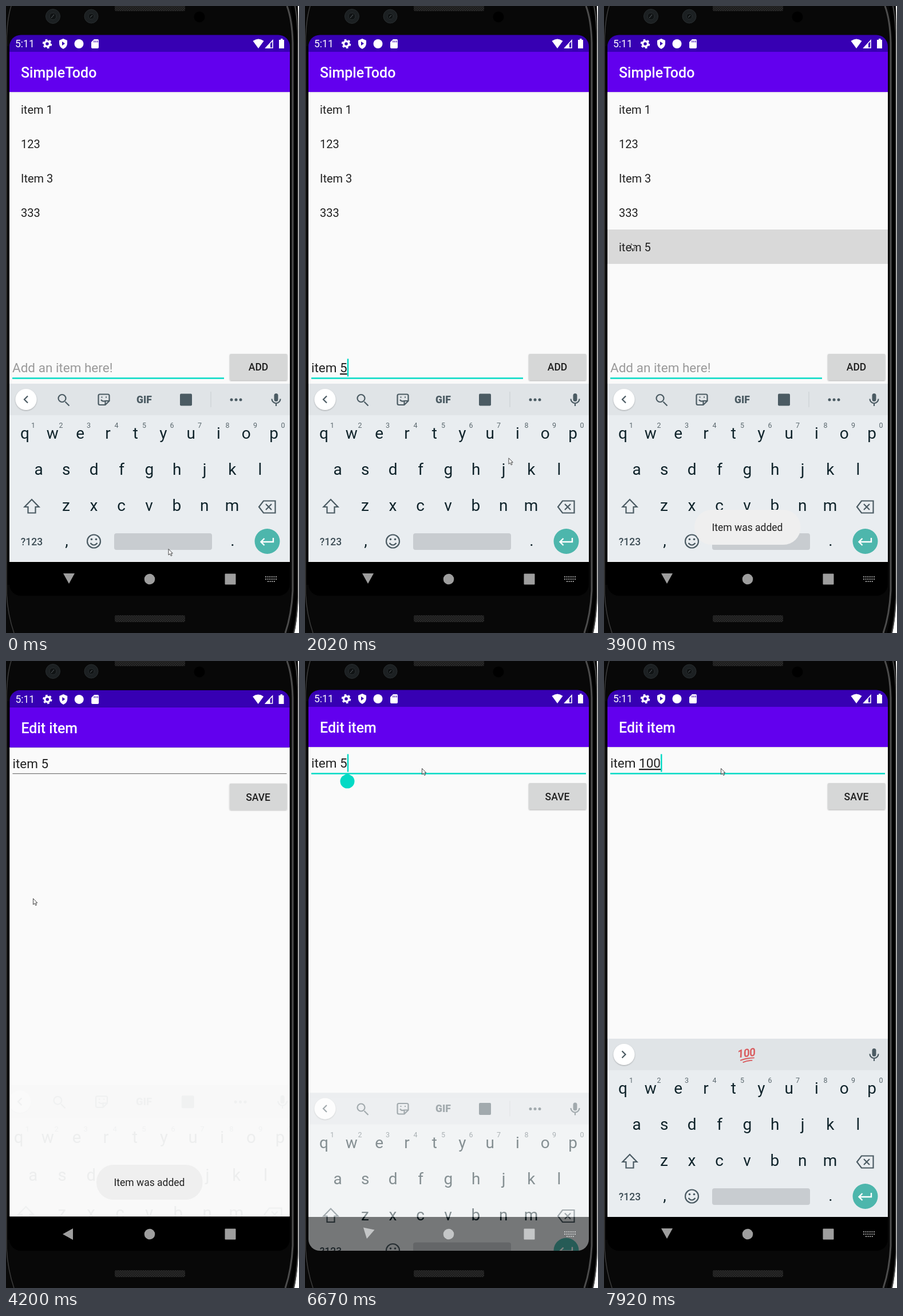
An HTML page for the animation above (8 s loop, 512x1094 px).

```html
<!DOCTYPE html>
<html lang="en">
<head>
<meta charset="utf-8">
<title>Todo list demo</title>
<style>
  html, body { margin: 0; height: 100%; overflow: hidden; background: #fff; }
  svg { display: block; width: 100vw; height: 100vh; font-family: Roboto, sans-serif; }
  text { white-space: pre; }
  .mid { text-anchor: middle; }
  .title { font-size: 25px; font-weight: 500; fill: #fff; }
  .item { font-size: 20px; fill: #212121; }
  .field { font-size: 22.5px; fill: #212121; }
  .label { font-size: 17.5px; font-weight: 500; fill: #1f1f1f; text-anchor: middle; }
  .key { font-size: 28px; fill: #10242b; text-anchor: middle; }
  .hint { font-size: 12.5px; fill: #5b686e; text-anchor: middle; }
  .word { font-size: 22.5px; fill: #6d787e; text-anchor: middle; }
  .line { fill: none; stroke: #4b5b63; stroke-width: 2.2; }
  .typed { text-decoration: underline; }
</style>
</head>
<body>
<svg viewBox="0 0 512 1094" preserveAspectRatio="none">
  <defs>
    <clipPath id="screen"><rect x="6" y="50.5" width="490" height="978.5" rx="20"/></clipPath>
    <clipPath id="aboveNav"><rect x="6" y="50" width="490" height="919"/></clipPath>
    <pattern id="mesh" width="4" height="4" patternUnits="userSpaceOnUse">
      <rect width="4" height="4" fill="#1a1a1a"/><path d="M0 0l4 4M4 0L0 4" stroke="#303030" stroke-width=".7"/>
    </pattern>
    <filter id="shadow" x="-20%" y="-20%" width="140%" height="150%">
      <feDropShadow dx="0" dy="1" stdDeviation="1.2" flood-opacity=".3"/>
    </filter>
  </defs>

  <!-- phone body -->
  <path d="M0 0H510Q511 30 511 64V1030Q510 1066 504 1094H0z" fill="#080808"/>
  <g fill="none">
    <path d="M9 0Q2 22 1 60V1025Q3 1062 14 1094" stroke="#3c3c3c" stroke-width="1.5"/>
    <path d="M4 70V1010" stroke="#000" stroke-width="4"/>
    <path d="M491 0Q500 24 501 64V1020Q499 1062 488 1094" stroke="#4c4c4c" stroke-width="3"/>
    <path d="M500 0Q506 30 506 64V1030Q504 1066 497 1094" stroke="#000" stroke-width="5"/>
    <path d="M505 0Q510 24 510 64V1030Q509 1066 503 1094" stroke="#555" stroke-width="1.5"/>
  </g>
  <g fill="#1c2022" stroke="#292e30">
    <circle cx="82" cy="18" r="12.5"/><circle cx="149" cy="18" r="12"/>
    <circle cx="82" cy="18" r="6" fill="#101314"/><circle cx="149" cy="18" r="5" fill="#101314"/>
  </g>
  <path d="M79 21l5-6M147 20l4-4" stroke="#596064"/>
  <circle cx="338" cy="19" r="9.5"/>
  <rect x="190" y="-4" width="123" height="13" rx="3" fill="url(#mesh)"/>
  <rect x="190" y="1063" width="123" height="12" rx="3" fill="url(#mesh)"/>

  <g clip-path="url(#screen)">
    <rect x="6" y="50" width="490" height="979"/>
    <g id="app">
      <rect x="6" y="150" width="490" height="820" fill="#fafafa"/>
      <g id="listPage">
        <rect id="pressedRow" x="6" y="390" width="490" height="60" fill="#d9d9d9"/>
        <g id="items"></g>
        <text id="placeholder" class="field" x="11" y="639" style="fill:#999">Add an item here!</text>
        <text id="newText" class="field" x="11" y="639"></text>
        <path d="M11 649.5H381" stroke="#03dac5" stroke-width="2.5"/>
        <rect id="addButton" x="391" y="607" width="100.5" height="46" rx="2" filter="url(#shadow)"/>
        <text class="label" x="441" y="636">ADD</text>
      </g>
      <g id="editPage">
        <rect x="6" y="150" width="490" height="820" fill="#fafafa"/>
        <text id="editText" class="field" x="11" y="186"></text>
        <rect id="editLine" x="11" y="195.2" width="480"/>
        <rect x="391" y="213" width="100.5" height="46" rx="2" fill="#d6d7d7" filter="url(#shadow)"/>
        <text class="label" x="441" y="243">SAVE</text>
      </g>
      <path id="handle" d="M74 196L83 201.2A12.5 12.5 0 1 1 65 201.2Z" fill="#03dac5"/>
      <rect id="caret" width="2.5" height="31" fill="#03dac5"/>
      <rect x="6" y="150" width="490" height="1.5" fill="#e3dfeb"/>
      <rect x="6" y="80" width="490" height="70" fill="#6200ee"/>
      <rect x="6" y="50" width="490" height="30" fill="#3700b3"/>
      <text id="title" class="title" x="26" y="125"></text>
      <g fill="#fff">
        <text x="16" y="72" font-size="17.5">5:11</text>
        <circle cx="72" cy="66" r="4.5" fill="none" stroke="#fff" stroke-width="3.5"/>
        <circle cx="72" cy="66" r="7" fill="none" stroke="#fff" stroke-width="2.5" stroke-dasharray="3.67 3.66"/>
        <path d="M100 57l7 3v5q0 7-7 10q-7-3-7-10v-5z"/>
        <path d="M98 62l5 3.5l-5 3.5z" fill="#3700b3"/>
        <circle cx="127.5" cy="66" r="8"/>
        <path d="M154 58h6q2 0 2 2v12q0 2-2 2h-9q-2 0-2-2v-9z"/>
        <path d="M154 60.5v3M157 60.5v3M160 60.5v3" stroke="#3700b3" stroke-width="1.3"/>
        <path d="M431.5 61Q441 54 450.5 61L441 74z"/>
        <path d="M454 73L466 60V73z" fill="none" stroke="#fff" stroke-width="1.6"/><path d="M453 74l9-9v9z"/>
        <path d="M480 57h3.5v2h2.5v15h-9v-15h3z"/>
      </g>
    </g>

    <g fill="#9e9e9e">
      <path id="back" d="M99 1000L117 990V1010z"/>
      <circle cx="251" cy="1000" r="9.3"/>
      <rect x="382.5" y="990.5" width="19" height="19" rx="1"/>
      <path id="imeSwitch" fill="none" stroke="#9e9e9e" stroke-width="2" stroke-dasharray="2 1.6"
        d="M453 996h20M453 1000h20M457 1004h13"/>
    </g>

    <g id="keyboardLayer">
    <g id="keyboard">
      <rect x="6" y="659" width="490" height="311" fill="#e9edf0"/>
      <rect x="6" y="659" width="490" height="55" fill="#e0e4e7"/>
      <circle cx="35" cy="686.5" r="18.5" fill="#fff" filter="url(#shadow)"/>
      <path id="chevron" class="line"/>
      <g id="tools">
        <path class="line" d="M103.5 690.5l7 7"/><circle class="line" cx="98" cy="684.5" r="6.5"/>
        <path class="line" d="M164 677.5h14q2.5 0 2.5 2.5v9l-7 7h-9.5q-2.5 0-2.5-2.5v-13.5q0-2.5 2.5-2.5zM173.5 696v-7h7M166 687q3 4 7 2M166.5 682.5h2M174 682.5h2"/>
        <text class="mid" x="241.5" y="692.5" font-size="17.5" font-weight="900" fill="#4b5b63">GIF</text>
        <rect x="304" y="676.5" width="21" height="21" rx="2" fill="#4b5b63"/>
        <path d="M358 673v27" stroke="#c8cdd0"/>
        <g fill="#4b5b63"><circle cx="394" cy="687" r="2.5"/><circle cx="402" cy="687" r="2.5"/><circle cx="410" cy="687" r="2.5"/></g>
      </g>
      <g id="words">
        <path id="wordLines" d="M179.5 672v30M321 672v30" stroke="#c0c6c9"/>
        <text class="word" x="116" y="696"></text>
        <text class="word" x="249.5" y="696"></text>
        <text class="word" x="383.5" y="696"></text>
      </g>
      <g id="hundred" transform="rotate(-7 249 687)">
        <text class="mid" x="249.5" y="690.5" font-size="19" font-weight="500" font-style="italic" fill="#d9595c" stroke="#d9595c" stroke-width=".4">100</text>
        <path d="M237 695.500q11-3 25-1.500M241 699.500q8-2.500 17-1.500" fill="none" stroke="#d9595c" stroke-width="1.800"/>
      </g>
      <rect x="468.5" y="676" width="7" height="14" rx="3.5" fill="#4b5b63"/>
      <path class="line" d="M464.5 685.5a7.5 7.5 0 0 0 15 0M472 693v5"/>
      <g id="keys"></g>
      <path class="line" d="M45 861l12.5 13h-6v10.5h-13v-10.5h-6z"/>
      <path class="line" d="M450 863.5h20.5v21H450l-8-10.5zM454 869l10 10M464 869l-10 10"/>
      <text class="mid" x="45" y="941" font-size="17.5" fill="#3d4d55" font-weight="500">?123</text>
      <circle class="line" cx="153.5" cy="934" r="11.5"/>
      <path class="line" d="M147.5 937q6 7 12 0"/>
      <circle cx="149.5" cy="930.5" r="1.8" fill="#4b5b63"/><circle cx="157.5" cy="930.5" r="1.8" fill="#4b5b63"/>
      <rect x="189" y="920" width="171" height="29" rx="4" fill="#c8ccd0"/>
      <circle cx="456.5" cy="934" r="22" fill="#4db6ac"/>
      <path d="M467 928v7h-21M451.5 929l-6 6l6 6" fill="none" stroke="#fff" stroke-width="2.4"/>
    </g>
    </g>

    <g id="toast">
      <rect x="158" y="879" width="185.5" height="61" rx="30" fill="#efefef"/>
      <text class="mid" x="250.5" y="916" font-size="17.5" fill="#212121">Item was added</text>
    </g>
  </g>
  <path id="pointer" d="M0 0V10.5L2.5 8.2L4.2 12L6 11.2L4.3 7.5H7.3z" fill="#fff" stroke="#333" stroke-width=".9"/>
</svg>

<script>
const LOOP = 8000;
const $ = id => document.getElementById(id);
const svgNS = 'http://www.w3.org/2000/svg';

// The picture only changes at these moments.
const steps = [0, 250, 650, 790, 930, 1070,
  1600, 1730, 1870, 2000, 2130, 2270, 2400, 2530,
  2650, 2800, 2930, 3060, 3190, 3330, 3460, 3590,
  3750, 3900, 4050, 4200, 4350,
  4630, 4770, 4910, 5050, 5180, 5320, 5450, 5590,
  5710, 5830, 5980, 6120, 6250, 6390, 6530, 6670,
  6820, 6950, 7390, 7520, 7660, 7790, 7920];

const pointerPath = [[1600, 284, 947.5], [2400, 428, 630], [2650, 428, 630], [2800, 304.5, 616],
  [3190, 62, 425], [3460, 47.5, 414.5], [4630, 47.5, 414.5], [5180, 390, 400],
  [5590, 300, 293], [5830, 228.5, 220], [6120, 204.5, 187.5]];
// time, opacity, vertical shift, scale
const keyboardPath = [[3900, 1, 0, 1], [4050, .5, 28, 1.02], [4200, .05, 48, 1.05], [4350, 0, 48, 1.05],
  [6390, 0, 160, 1], [6530, .15, 140, 1], [6670, .5, 94.5, 1], [6820, .9, 20, 1], [6950, 1, 0, 1]];
const backTurn = [[3900, -90], [4200, 0], [6530, 0], [6670, -78], [6820, -90]];
const addedFade = [[2650, 0], [2800, .08], [2930, 1]];
const toastFade = [...addedFade, [4630, 1], [4910, 0]];
const editFade = [[3900, 0], [4050, .6], [4200, 1]];
const appScale = [[3900, 1], [4050, .996], [4200, .998], [4350, 1]];

const newTexts = [[0, ''], [650, 'i'], [790, 'ite'], [930, 'item'], [1070, 'item '], [1600, 'item 5'], [2650, '']];
const editTexts = [[0, 'item 5'], [7390, 'item '], [7520, 'item 1'], [7660, 'item 10'], [7790, 'item 100']];
const next = ['4', 'is', 'has'];
const suggestions = [[0, null], [650, ['I', 'i', 'in']], [790, ['ite', 'item', 'items']],
  [930, ['Item', 'item', 'items']], [1070, next], [1600, null], [7390, next], [7520, []]];

const latest = (list, t) => list.filter(([start]) => start <= t).pop()[1];

function track(points, t) {
  const i = points.findIndex(p => p[0] > t);
  if (i === 0) return points[0].slice(1);
  if (i < 0) return points[points.length - 1].slice(1);
  const a = points[i - 1], b = points[i], k = (t - a[0]) / (b[0] - a[0]);
  return a.slice(1).map((v, n) => v + (b[n + 1] - v) * k);
}

function addText(parent, cls, x, y, content) {
  const el = document.createElementNS(svgNS, 'text');
  el.setAttribute('class', cls);
  el.setAttribute('x', x);
  el.setAttribute('y', y);
  el.textContent = content;
  parent.append(el);
  return el;
}

function show(id, visible) { $(id).style.display = visible ? '' : 'none'; }

function setField(el, value, composing) {
  const cut = composing ? value.lastIndexOf(' ') + 1 : value.length;
  const word = document.createElementNS(svgNS, 'tspan');
  word.setAttribute('class', 'typed');
  word.textContent = value.slice(cut);
  el.replaceChildren(value.slice(0, cut), word);
}

['item 1', '123', 'Item 3', '333'].forEach((s, i) => addText($('items'), 'item', 26, 188 + i * 60, s));
const addedItem = addText($('items'), 'item', 26, 428, 'item 5');

[['qwertyuiop', 33, 755], ['asdfghjkl', 57, 818], ['zxcvbnm', 105, 881]].forEach(([row, x, y]) =>
  [...row].forEach((c, i) => addText($('keys'), 'key', x + i * 48.35, y, c)));
[...'1234567890'].forEach((c, i) => addText($('keys'), 'hint', 47.5 + i * 48.5, 736, c));
addText($('keys'), 'key', 106, 942, ',');
addText($('keys'), 'key', 396, 942, '.');

function draw(t) {
  const editing = t >= 4050, focused = t >= 6250, typing = t >= 7390;

  $('title').textContent = editing ? 'Edit item' : 'SimpleTodo';
  const [scale] = track(appScale, t);
  $('app').setAttribute('transform', `translate(${251 * (1 - scale)} ${540 * (1 - scale)}) scale(${scale})`);
  $('editPage').style.opacity = track(editFade, t)[0];

  const newValue = latest(newTexts, t);
  setField($('newText'), newValue, true);
  show('placeholder', !newValue);
  addedItem.style.opacity = track(addedFade, t)[0];
  show('pressedRow', t >= 3750 && t < 4200);
  $('addButton').setAttribute('fill', t >= 2650 && t < 2930 ? '#c2c2c2' : '#d6d7d7');

  setField($('editText'), latest(editTexts, t), typing);
  $('editLine').setAttribute('fill', focused ? '#03dac5' : '#777');
  $('editLine').setAttribute('height', focused ? 2.5 : 1.25);
  show('handle', focused && !typing);

  const field = editing ? $('editText') : $('newText');
  show('caret', editing ? focused : t >= 250 && t < 3190);
  $('caret').setAttribute('x', 11 + field.getComputedTextLength());
  $('caret').setAttribute('y', editing ? 162.5 : 615.5);

  const [opacity, shift, zoom] = track(keyboardPath, t);
  $('keyboard').style.opacity = opacity;
  $('keyboard').setAttribute('transform', `translate(${250.5 * (1 - zoom)} ${shift}) scale(${zoom})`);
  $('keyboardLayer').setAttribute('clip-path', focused ? 'none' : 'url(#aboveNav)');
  const words = latest(suggestions, t);
  show('tools', !words);
  show('words', words);
  show('wordLines', words && words.length);
  show('hundred', t >= 7920);
  $('chevron').setAttribute('d', words ? 'M31.5 680.5l6 6l-6 6' : 'M38 680.5l-6 6l6 6');
  $('words').querySelectorAll('text').forEach((el, i) => { el.textContent = words && words[i] || ''; });

  $('back').setAttribute('transform', `rotate(${track(backTurn, t)[0]} 108.5 998.5)`);
  show('imeSwitch', t < 4050 || t >= 6670);
  $('toast').style.opacity = track(toastFade, t)[0];
  $('pointer').setAttribute('transform', `translate(${track(pointerPath, t).join(' ')})`);
}

const start = performance.now();
function frame() {
  const t = (performance.now() - start) % LOOP;
  draw(steps.filter(s => s <= t).pop());
  requestAnimationFrame(frame);
}
frame();
</script>
</body>
</html>
```
